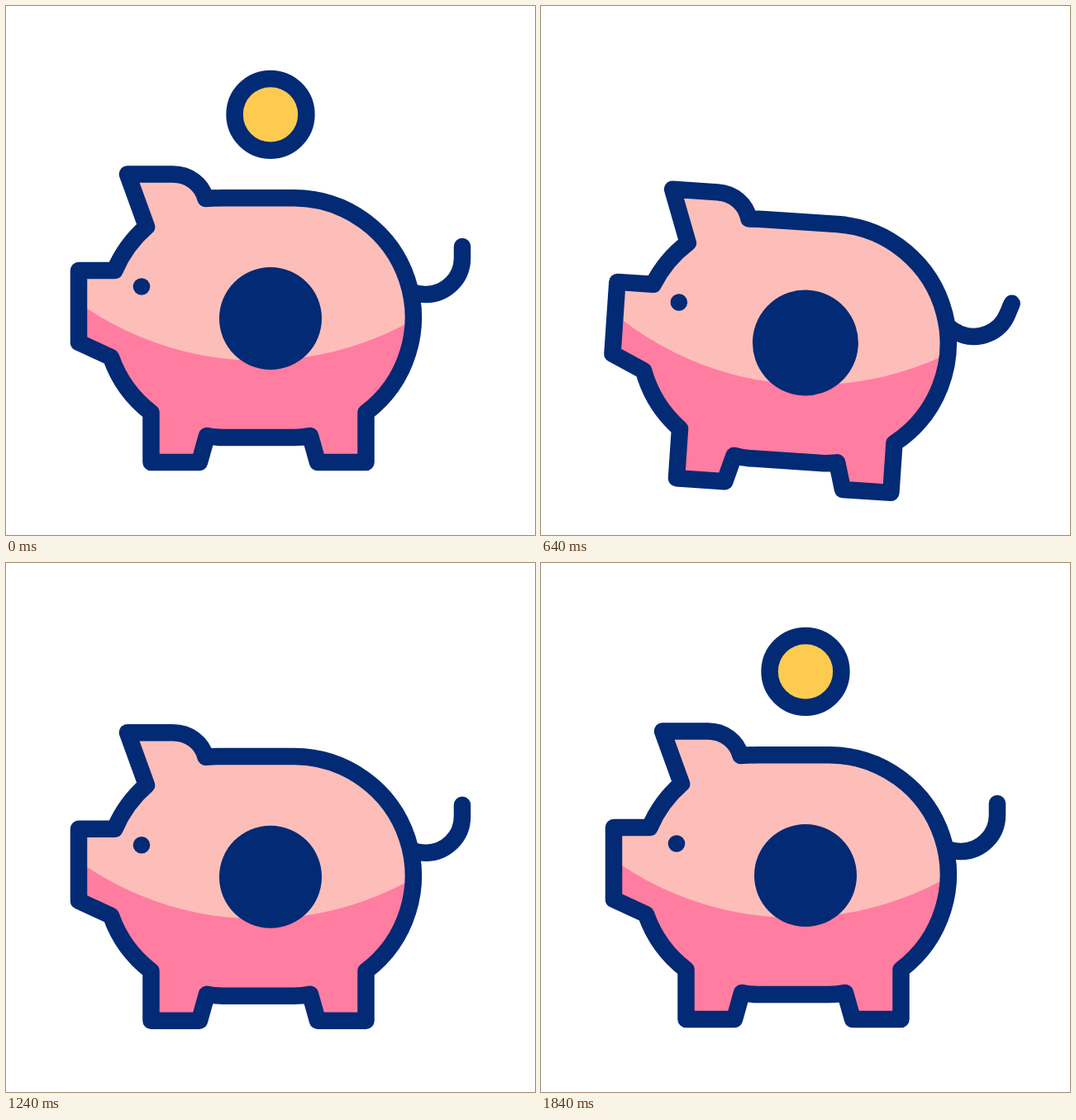
Recreate the animation shown at these times as an HTML page. Size 640 by 640 pixels, loop 2000 ms.

```html
<!DOCTYPE html>
<html lang="en">
<head>
<meta charset="utf-8">
<title>Piggy bank</title>
<style>
  html, body { margin: 0; width: 100%; height: 100%; overflow: hidden; background: #fff; }
  svg { display: block; width: 100%; height: 100%; }
  .line { stroke: #032a75; stroke-width: 20.5; stroke-linecap: round; stroke-linejoin: round; }
  .navy { fill: #032a75; }
</style>
</head>
<body>
<svg viewBox="0 0 640 640">
  <defs>
    <path id="body" d="M147 203.5H202C221 203.5 237 215.5 241.5 233Q252 232.3 262 232.3H349
      A144.5 144.5 0 0 1 435.5 492V552H377L368 520Q358 522 349 522H262Q253 522 243 520L234 552H175.5V492
      A144.5 144.5 0 0 1 127 425L88 407V320H131.5A144.5 144.5 0 0 1 170 267Z"/>
    <clipPath id="bodyClip"><use href="#body"/></clipPath>
  </defs>
  <ellipse id="coin" class="line" cx="320" ry="43.4" fill="#fdcb50"/>
  <g id="pig">
    <path id="tail" class="line" fill="none" d="M552 291V305A44 44 0 0 1 508 349Q500 349 494 347"/>
    <use href="#body" fill="#ff7da0"/>
    <circle cx="306.6" cy="52.2" r="376.8" fill="#fdbeb9" clip-path="url(#bodyClip)"/>
    <use href="#body" class="line" fill="none"/>
    <circle class="navy" cx="164" cy="339.5" r="10.3"/>
    <circle id="badge" class="navy" cx="320" cy="378"/>
  </g>
</svg>
<script>
const LOOP = 2000, STEP = 40;
const [coin, pig, tail, badge] = ['coin', 'pig', 'tail', 'badge'].map(id => document.getElementById(id));

const smooth = p => p * p * (3 - 2 * p);
const cubic = p => p < 0.5 ? 4 * p ** 3 : 1 - 4 * (1 - p) ** 3;

// Interpolates a list of [time, value] keys.
function track(t, keys, ease = smooth) {
  if (t <= keys[0][0]) return keys[0][1];
  for (let i = 1; i < keys.length; i++) {
    const [t0, v0] = keys[i - 1], [t1, v1] = keys[i];
    if (t < t1) return v0 + (v1 - v0) * ease((t - t0) / (t1 - t0));
  }
  return keys[keys.length - 1][1];
}

function draw(t) {
  const drop = track(t, [[125, 0], [705, 28.8], [900, 28.8], [1350, 0]], cubic);
  const rock = track(t, [[417, 0], [650, 3.9], [900, -3.9], [1130, 0]]);
  const wag = track(t, [[417, 0], [655, 18.8], [890, 0]]);
  const pulse = track(t, [[533, 1], [883, 1.14], [1183, 1]]);
  const fall = track(t, [[125, 0], [705, 176], [1205, 176], [1605, 0]], cubic);
  const flip = track(t, [[1495, 1], [1665, 0], [1830, 1]]);

  pig.setAttribute('transform', `translate(0 ${drop}) rotate(${rock} 308 377)`);
  tail.setAttribute('transform', `rotate(${wag} 490 345)`);
  badge.setAttribute('r', 62 * pulse);
  coin.setAttribute('cy', 131.3 + fall);
  coin.setAttribute('rx', Math.max(0.5, 43.4 * flip));
}

function frame() {
  const t = performance.now() % LOOP;
  draw(Math.floor(t / STEP) * STEP);
  requestAnimationFrame(frame);
}
frame();
</script>
</body>
</html>
```
